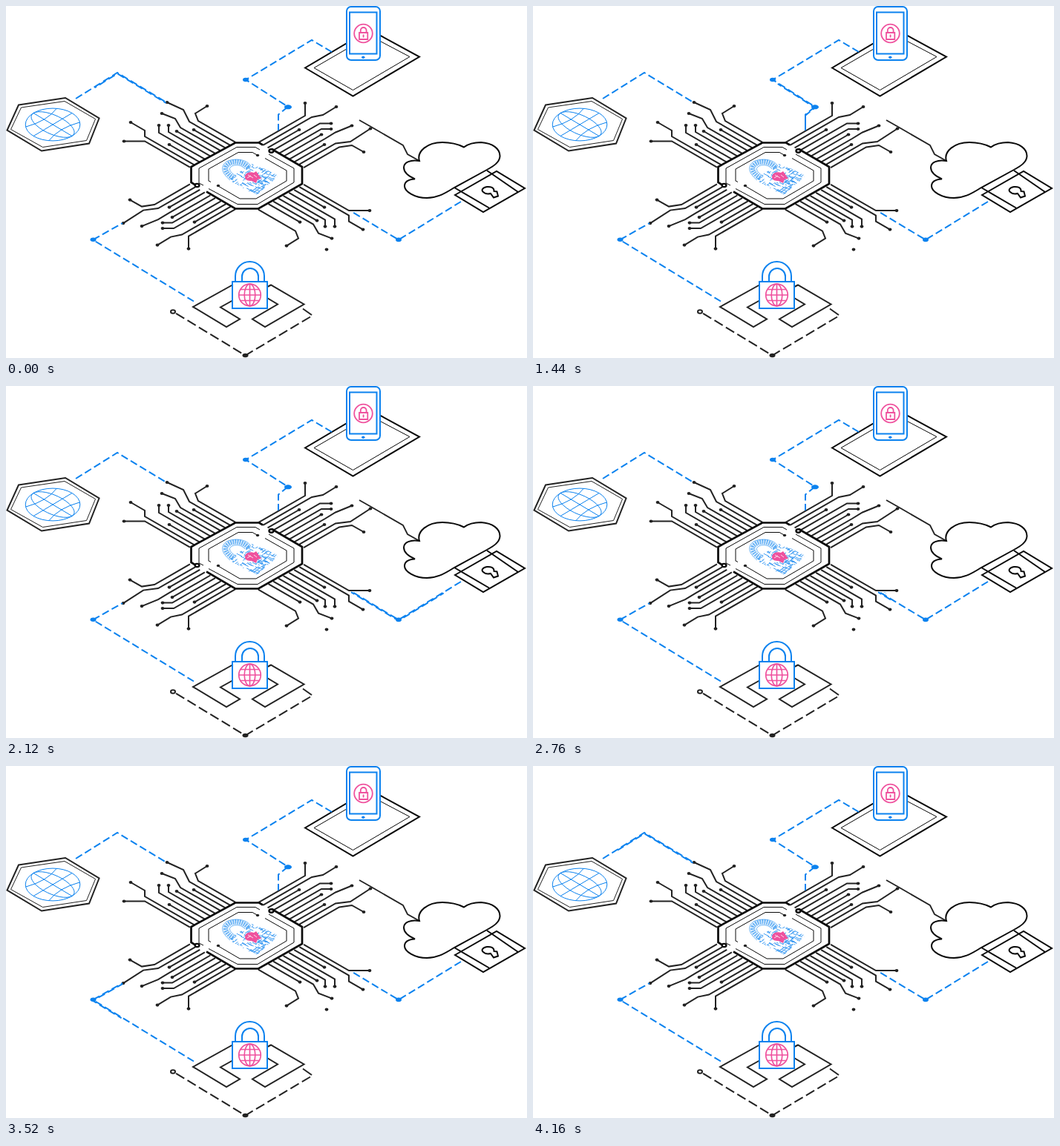
An HTML page for the animation above (4200 ms loop, 702 by 475 pixels).

```html
<!DOCTYPE html>
<html lang="en">
<head>
<meta charset="utf-8">
<title>Secure network</title>
<style>
  html, body { margin: 0; width: 100%; height: 100%; overflow: hidden; background: #fff; }
  svg { display: block; width: 702px; height: 475px; fill: none; stroke-width: 2; }
  .ink { stroke: #222; }
  .black { stroke: #0a0a0a; }
  .blue { stroke: #0b82ef; }
  .pink { stroke: #ef529e; }
  .thin { stroke-width: 1; }
  .white { fill: #fff; }
  .dots { fill: #0b82ef; stroke: none; }
  .pads { fill: #222; stroke: none; }
  .globe * { vector-effect: non-scaling-stroke; }
  .link { stroke-dasharray: 10 4.5; }
  .echo { stroke-dashoffset: 6; }
  .pulse { stroke: #fff; stroke-width: 8; stroke-dasharray: 0 2; opacity: 0; animation: pulse 4200ms linear infinite; }
  .ring { stroke-width: 3; opacity: 0; animation: ring 4200ms linear infinite; }

  /* A pulse fills its route quickly, then empties from the starting end. */
  @keyframes pulse {
    0% { opacity: 1; stroke-dasharray: 0 2; stroke-dashoffset: 0; }
    1.9% { opacity: 1; stroke-dasharray: .84 2; stroke-dashoffset: -.16; }
    17.2% { opacity: 1; stroke-dasharray: .14 2; stroke-dashoffset: -.86; }
    17.21%, 100% { opacity: 0; stroke-dasharray: 0 2; stroke-dashoffset: 0; }
  }
  @keyframes ring {
    0% { opacity: 1; r: 0px; }
    4.76% { opacity: .78; r: 28px; }
    8.8% { opacity: .08; r: 50.5px; }
    8.81%, 100% { opacity: 0; r: 50.5px; }
  }
</style>
</head>
<body>
<svg viewBox="0 0 702 475">
  <defs>
    <clipPath id="bodyClip"><path d="M299 234L333 212L367 229L337 256Z"/></clipPath>
  </defs>

  <!-- Globe tile -->
  <path class="ink" d="M17 133.500L80 124L125.500 151.500L112 185.500L48 195.500L1.500 167.500Z"/>
  <path class="ink thin" d="M20.500 137L79 128.500L120.500 152.500L108.500 181.500L49.500 190.500L6.500 166.500Z"/>
  <g class="blue thin globe" transform="matrix(26 15.500 26 -15.500 63 160)">
    <circle r="1"/>
    <ellipse rx="1" ry=".5"/>
    <path d="M-1 0H1M0 -1V1M-.6 -.8Q-.3 0 -.6 .8M.6 -.8Q.3 0 .6 .8"/>
  </g>

  <!-- Phone -->
  <path class="ink black" d="M403 83.500L467.500 121.500L557 68.500L490 32Z"/>
  <path class="ink black thin" d="M415 83.500L467.500 113.500L544 68.500L490 40Z"/>
  <g class="blue">
    <rect class="white" x="459" y="1" width="45" height="72" rx="6"/>
    <rect x="463" y="8.500" width="36.500" height="56"/>
    <ellipse class="dots" cx="481.300" cy="69.300" rx="2.200" ry="1.800"/>
  </g>
  <g class="pink" stroke-width="1.800">
    <circle cx="481.500" cy="37" r="12.300"/>
    <path d="M476 36H487.300V45H476ZM477.800 36V33A3.900 4 0 0 1 485.600 33V36M481.600 38.500V42.500"/>
  </g>

  <!-- Cloud and safe -->
  <g class="ink black">
    <path stroke-width="1.800" stroke="#222" d="M476 154L491 162.500L535 188L541 200L557 209"/>
    <path d="M604 245C590 254 580 259 567 259C550 259 537 250 537 243C537 237 543 234 551 233.500C541 229 536 224 536 218C536 211 545 207 557 209C553 196 568 184 588 184C600 184 610 187 617 190.500C623 186 632 184 640 184C656 185 666 193 665.500 203C665 211 657 216 648 221Z"/>
    <path d="M605 255L661 223L699 246L643 278ZM604 245L651 272.500M648 222L690 251"/>
    <path class="white" d="M653 253L657 258.500L663 256.500L661.500 250.500L657.500 250C658 245 653 243.500 648 244C642 245 640 248.500 643 251C645.500 253.500 649 254 653 253Z"/>
  </g>

  <!-- Padlock base -->
  <g class="ink">
    <path d="M305 376.500L252 406L297 433L315 422.500L289 406.500L306 397"/>
    <path d="M352 379L357 376.500L401.500 402.500L349 433L332 422.500L366 402.500L352 394"/>
    <path d="M400 408.500L412 417"/>
    <path stroke-dasharray="13 5" d="M410 419.500L322.500 471.500L226 413"/>
    <ellipse class="white" cx="225" cy="412.500" rx="3" ry="2.200"/>
    <ellipse class="pads" cx="322.500" cy="471.500" rx="4" ry="2.700"/>
  </g>
  <g class="blue">
    <path d="M309 372V364.500A19.500 19.500 0 0 1 348 364.500V372M318 372V365A11 11 0 0 1 340 365V372"/>
    <rect class="white" x="305" y="372" width="47" height="36"/>
  </g>
  <g class="pink" stroke-width="1.700">
    <circle cx="328.500" cy="390" r="14.800"/>
    <ellipse cx="328.500" cy="390" rx="7.300" ry="14.800"/>
    <path d="M328.500 375V405M313.500 390H343.500M316 382.500H341M316 397.500H341"/>
  </g>

  <!-- Chip -->
  <g id="upper" class="ink"></g>
  <g id="lower" class="ink" transform="rotate(180 324.500 229.300)"></g>
  <g class="ink black">
    <g stroke-width="2.700">
      <path d="M358 193L399 217V240L340 273.500H309L270 250.500"/>
      <path d="M256 242L249.500 238V217L309 184.500H341L346 187.500"/>
    </g>
    <g class="thin">
      <path d="M342 194L336 190.500H311L260 219V239L266 242M273 246.500L312 267.500H339L388 238V219L354 200"/>
      <path d="M339 201.500L332 197.500H313L273 220V236L276 237.500M286 243L315 260H337L378 236V222L349 205.500"/>
    </g>
    <g class="white" stroke-width="2.400">
      <ellipse cx="357.500" cy="195.500" rx="3" ry="2.200"/>
      <ellipse cx="257.500" cy="242" rx="2.900" ry="2.100"/>
    </g>
    <g class="pads">
      <ellipse cx="339" cy="201.500" rx="2.200" ry="1.800"/>
      <ellipse cx="286" cy="242.500" rx="2.200" ry="1.800"/>
    </g>
  </g>

  <!-- Emblem -->
  <g class="blue thin">
    <path stroke-width="6.500" stroke-dasharray="2 1" opacity=".6" d="M306 232C297 226 293 219 299 214C306 208 320 209 327 219"/>
    <path opacity=".6" d="M302 235C291 226 288 217 297 210C307 205 324 206 330 216M309 229C303 225 299 220 303 217C308 213 318 214 322 220"/>
    <g id="hatch" clip-path="url(#bodyClip)" opacity=".8"></g>
  </g>
  <g class="pink">
    <path stroke="none" fill="#ef529e" d="M322 231C322 226 328 223 334 225L337 223L344 233L339 234L337 239L331 236C326 236 322 235 322 231Z"/>
    <path stroke="#fff" stroke-width=".8" d="M326 228L333 232M325 232L330 229M334 228L338 231"/>
  </g>

  <!-- Links -->
  <g id="links" class="blue"></g>
  <g class="dots">
    <ellipse cx="323" cy="99.500" rx="4" ry="2.800"/>
    <ellipse cx="380" cy="136.300" rx="5" ry="3"/>
    <ellipse cx="529" cy="315.300" rx="4" ry="2.900"/>
    <ellipse cx="117.500" cy="315.300" rx="4" ry="2.700"/>
  </g>
  <g class="blue">
    <circle class="ring" style="animation-delay:600ms" cx="216" cy="129" r="0"/>
    <circle class="ring" style="animation-delay:1680ms" cx="366.500" cy="166.500" r="0"/>
    <circle class="ring" style="animation-delay:2760ms" cx="474" cy="280" r="0"/>
    <circle class="ring" style="animation-delay:3760ms" cx="155" cy="290" r="0"/>
  </g>
</svg>
<script>
  const byId = id => document.getElementById(id);

  function add(parent, tag, attrs) {
    const el = document.createElementNS('http://www.w3.org/2000/svg', tag);
    for (const name in attrs) el.setAttribute(name, attrs[name]);
    parent.append(el);
    return el;
  }

  // The last leg of each trace runs inward at 30 degrees to the chip's edge.
  function trace(group, route, wired = true) {
    const points = route.split(' ').map(p => p.split(',').map(Number));
    const [x, y] = points[points.length - 1];
    const dx = x - 324, dy = y - 229;
    const run = (Math.abs(dy) + 0.55 * Math.abs(dx) - 53.25) / 1.127;
    const end = [x - Math.sign(dx) * run, y - Math.sign(dy) * run * 0.577];
    if (wired) add(group, 'polyline', { points: [...points, end].join(' ') });
    const [cx, cy] = points[0];
    add(group, 'ellipse', { class: 'pads', cx, cy, rx: 2.4, ry: 2.1 });
  }

  // The lower half is the upper half turned round, with one pad left unwired.
  const routes = [
    '217,130 239,140 247,156', '271,135 255,145 259,155', '210,145 228,152 235,164',
    '253,167', '230,169', '219,161 219,170', '206,161 206,171',
    '168,157 187,168 187,176', '220,187', '159,182.5 187,182.5',
    '403,131 403,148', '445,136 427,147 412,150', '395,167', '438,158.5 423,158.5',
    '438,166 425,166', '425,173.5', '466,161.5 444,170.5 430,179', '429,187',
    '491,165.5 464,183 444,185.5', '482,197 466,188 449,190.5'
  ];
  routes.forEach((route, i) => {
    trace(byId('upper'), route);
    trace(byId('lower'), route, i > 0);
  });

  // Each pulse uncovers a second dashed line just below its link.
  function link(delay, d) {
    const links = byId('links');
    const id = 'pulse' + delay;
    const mask = add(links, 'mask', { id, maskUnits: 'userSpaceOnUse', x: 0, y: 0, width: 702, height: 475 });
    add(mask, 'path', { class: 'pulse', pathLength: 1, d, style: `animation-delay:${delay}ms` });
    add(links, 'path', { class: 'link', d });
    const cover = add(links, 'g', { mask: `url(#${id})` });
    add(cover, 'path', { class: 'link echo', d, transform: 'translate(0 1.2)' });
  }
  link(-120, 'M94 125L150 90L216 130');
  link(960, 'M439 62L412 46L323 99.5L380 136L367 146.5V168');
  link(2040, 'M613 264L529 315.5L465 277');
  link(3080, 'M253 398.5L117 315.5L157 293');

  let seed = 7;
  function random() {
    seed = (seed * 16807) % 2147483647;
    return seed / 2147483647;
  }

  // Short circuit strokes in the two directions of the tilted lock body.
  for (let i = 0; i < 230; i++) {
    const x = 296 + random() * 70, y = 212 + random() * 44;
    const length = 2 + random() * 6;
    const rise = random() < 0.5 ? -0.65 : 0.5;
    add(byId('hatch'), 'path', { d: `M${x} ${y}l${length} ${length * rise}` });
  }
</script>
</body>
</html>
```
